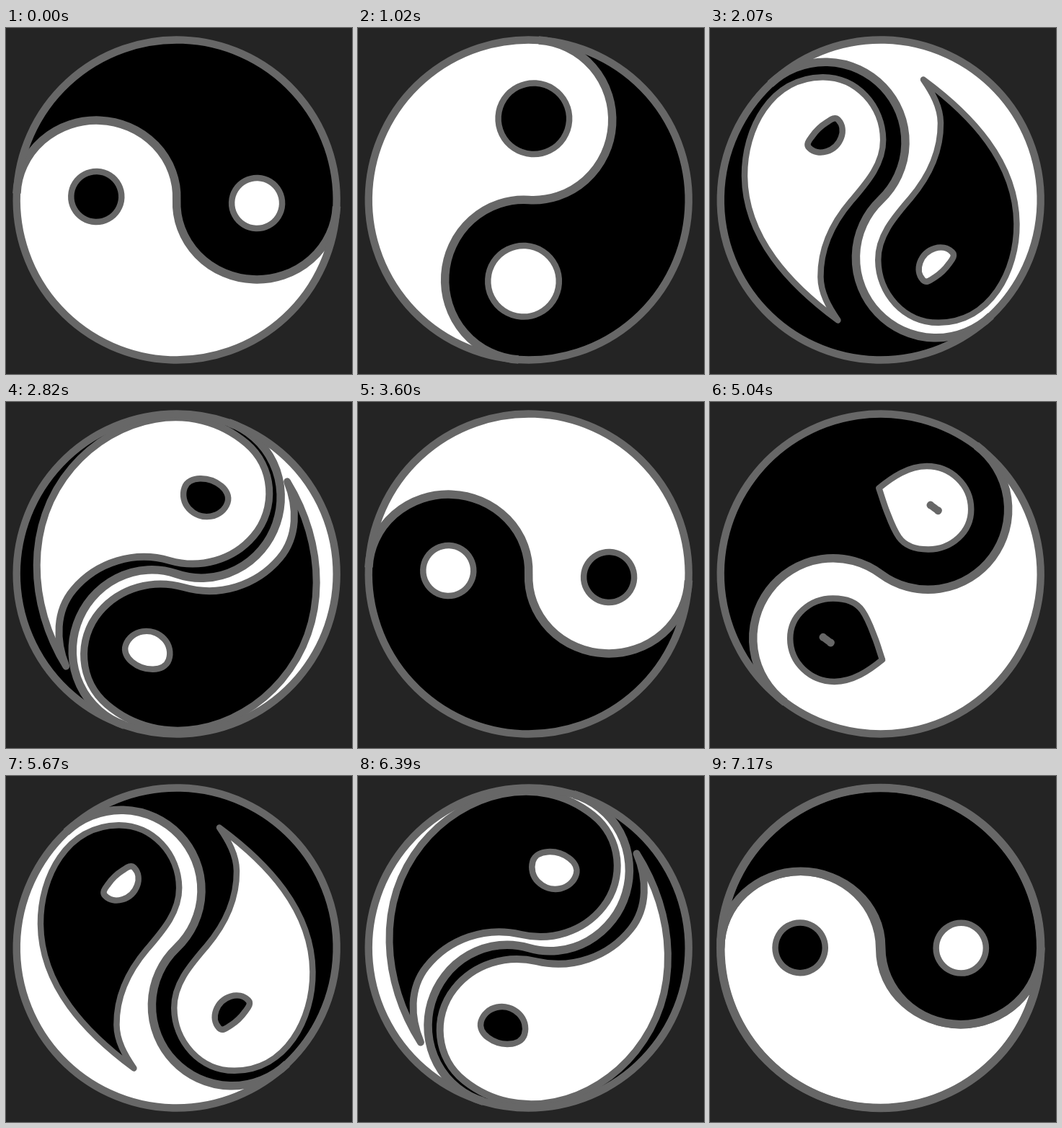
An HTML page with a canvas for the animation above (7.2 s loop, 480x480 px).

```html
<!DOCTYPE html>
<html lang="en">
<head>
<meta charset="utf-8">
<title>Recursive yin-yang</title>
<style>
  html, body { margin: 0; width: 100%; height: 100%; overflow: hidden; background: #242424; }
  canvas { display: block; width: 480px; height: 480px; }
</style>
</head>
<body>
<canvas id="stage" width="480" height="480"></canvas>
<script>
const ctx = document.getElementById('stage').getContext('2d');
const TAU = Math.PI * 2, RAD = Math.PI / 180;
const HALF = 3600, STEP = 30;
const CX = 236.7, CY = 238.5, R = 222, HEAD = R / 2;
const GRAY = '#676767', TONES = ['#000', '#fff'];

const lerp = (a, b, u) => a + (b - a) * u;
const wrap = a => a - TAU * Math.round(a / TAU);

// One full turn per half loop, quickest in the middle; result in degrees
function turnAt(t) {
  const x = TAU * t / HALF;
  return 2.3 + 360 * t / HALF
    - 12.5 * Math.sin(x) + 7.3 * Math.sin(2 * x) - 5.6 * Math.sin(3 * x);
}

const waveHeight = t => 108.5 - 2.5 * Math.cos(TAU * t / HALF);

// An outline is six nodes [x, y, heading] from the tail tip round the head (at the
// left) and back; "back" is the heading on return to the tip. Headings in degrees.
const shape = (back, ...nodes) => ({
  back: back * RAD,
  nodes: nodes.map(([x, y, dir]) => [x, y, dir * RAD])
});

// Circle that can be flattened on its outer (left) and inner side
function round(cx, cy, r, outer = 1, inner = 1) {
  const nodes = [];
  for (let k = 0; k < 6; k++) {
    const a = (90 + 60 * k) * RAD, dir = a + TAU / 4;
    const sx = Math.cos(a) < 0 ? outer : inner;
    const bent = dir + wrap(Math.atan2(Math.sin(dir), sx * Math.cos(dir)) - dir);
    nodes.push([cx + sx * r * Math.cos(a), cy + r * Math.sin(a), bent / RAD]);
  }
  return shape(540, ...nodes);
}

const drop = shape(484, [-94, 73, 194], [-158, 38, 233], [-147, -47, 323],
                   [-67, -33, 413], [-56, 10, 468], [-76, 47, 482]);

const comma = shape(369, [80, 158, 170], [-154, 114, 223], [-179, -59, 313],
                    [-58, -60, 403], [-27, 31, 444], [20, 134, 403]);

const half = shape(270, [R, 0, 90], [0, R, 180], [-R, 0, 270],
                   [-HEAD, -waveHeight(0), 360], [-1, 1, 450], [HEAD, waveHeight(0), 360]);

// Life of an eye: from a dash to a dot, a drop and a whole half
const LIFE = [
  { age: 1320, form: round(-118, -5, 0), width: 0 },
  { age: 1440, form: round(-118, -5, 7.5, .1, .1), width: 8.5 },
  { age: 2070, form: round(-121, -6, 28, .35, .85), width: 8.5 },
  { age: 3600, form: round(-111.5, 0, 35), width: 8.5 },
  { age: 4620, form: round(-113, 0, 49.3), width: 8.5 },
  { age: 5040, form: drop, width: 8.5 },
  { age: 5670, form: comma, width: 8.5 },
  { age: 7150, form: half, width: 11.5 }
];

// Blend two nodes, moving around the centre of the symbol
function swing([x0, y0, d0], [x1, y1, d1], u) {
  const a0 = Math.atan2(y0, x0);
  const a = a0 + wrap(Math.atan2(y1, x1) - a0) * u;
  const r = lerp(Math.hypot(x0, y0), Math.hypot(x1, y1), u);
  return [r * Math.cos(a), r * Math.sin(a), lerp(d0, d1, u)];
}

function eyeAt(age) {
  if (age <= LIFE[0].age) return null;
  let i = 0;
  while (i < LIFE.length - 2 && age >= LIFE[i + 1].age) i++;
  const a = LIFE[i], b = LIFE[i + 1];
  const u = Math.min(1, (age - a.age) / (b.age - a.age));
  return {
    nodes: a.form.nodes.map((n, k) => swing(n, b.form.nodes[k], u)),
    back: lerp(a.form.back, b.form.back, u),
    width: lerp(a.width, b.width, u)
  };
}

// Joins nodes with curves that become exact arcs where the headings allow it
function outline({ nodes, back }) {
  const [tipX, tipY] = nodes[0];
  const stops = [...nodes, [tipX, tipY, back]];
  ctx.beginPath();
  ctx.moveTo(tipX, tipY);
  for (let k = 1; k < stops.length; k++) {
    const [x0, y0, d0] = stops[k - 1], [x1, y1, d1] = stops[k];
    const chord = Math.hypot(x1 - x0, y1 - y0), way = Math.atan2(y1 - y0, x1 - x0);
    const reach = d => chord * 2 / 3 / (1 + Math.max(0, Math.cos(d - way)));
    const h0 = reach(d0), h1 = reach(d1);
    ctx.bezierCurveTo(x0 + h0 * Math.cos(d0), y0 + h0 * Math.sin(d0),
                      x1 - h1 * Math.cos(d1), y1 - h1 * Math.sin(d1), x1, y1);
  }
  ctx.closePath();
}

function wave(ry) {
  ctx.beginPath();
  ctx.ellipse(-HEAD, 0, HEAD, ry, 0, Math.PI, TAU);
  ctx.ellipse(HEAD, 0, HEAD, ry, 0, Math.PI, 0, true);
}

function disc() {
  ctx.beginPath();
  ctx.arc(0, 0, R, 0, TAU);
}

function fill(color) {
  ctx.fillStyle = color;
  ctx.fill();
}

function line(width) {
  ctx.lineWidth = width;
  ctx.stroke();
}

function drawEye(eye, color) {
  if (!eye) return;
  outline(eye);
  fill(color);
  line(eye.width);
}

function draw(time) {
  const t = time % HALF;
  const head = time < HALF ? 1 : 0;
  const ry = waveHeight(t);
  const outer = eyeAt(t + HALF), inner = eyeAt(t);

  ctx.setTransform(1, 0, 0, 1, 0, 0);
  ctx.clearRect(0, 0, 480, 480);
  ctx.translate(CX, CY);
  ctx.rotate(turnAt(t) * RAD);
  ctx.strokeStyle = GRAY;
  ctx.lineJoin = 'round';

  disc();
  fill(TONES[1 - head]);
  wave(ry);
  ctx.arc(0, 0, R, 0, Math.PI);
  fill(TONES[head]);
  wave(ry);
  line(11.5);

  for (const tone of [head, 1 - head]) {
    drawEye(outer, TONES[1 - tone]);
    drawEye(inner, TONES[tone]);
    ctx.rotate(Math.PI);
  }

  disc();
  line(10.4);
}

const start = performance.now();
function tick() {
  const time = (performance.now() - start) % (2 * HALF);
  draw(Math.floor(time / STEP) * STEP);
  requestAnimationFrame(tick);
}
tick();
</script>
</body>
</html>
```
